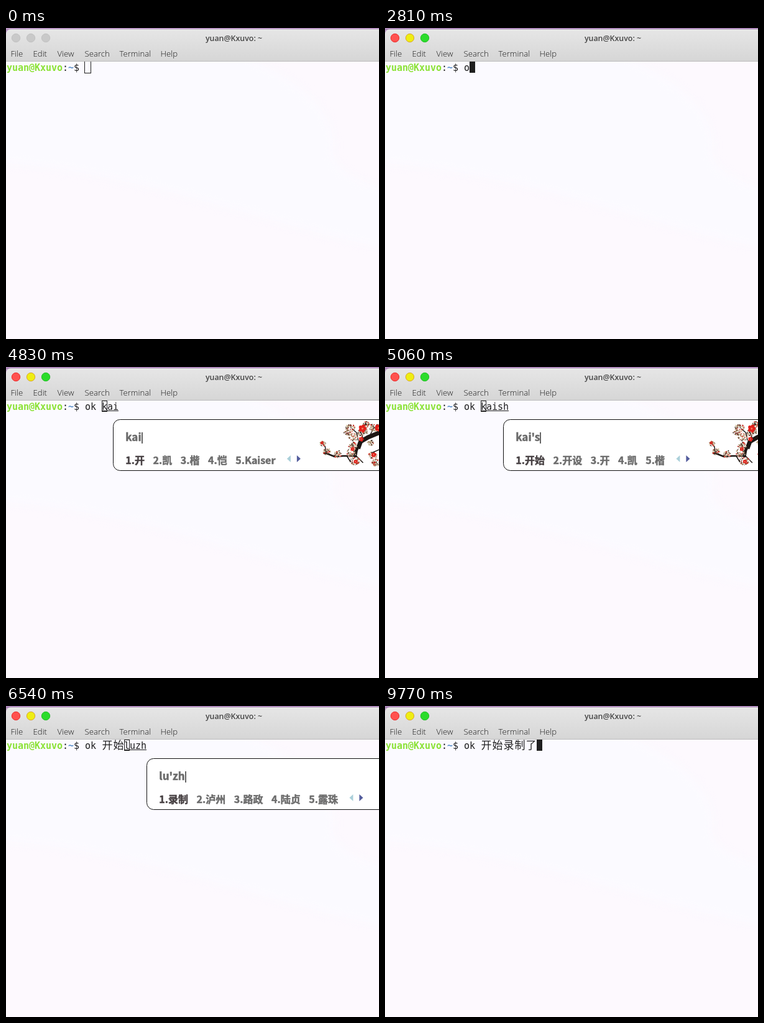
Write an HTML page with a canvas that moves like this. It is 600 by 500 pixels and loops after 9790 ms.

```html
<!DOCTYPE html>
<html lang="en">
<head>
<meta charset="utf-8">
<title>Terminal</title>
<style>
  html, body { margin: 0; width: 100%; height: 100%; overflow: hidden; background: #fdf9fe; }
  canvas { display: block; width: 600px; height: 500px; }
</style>
</head>
<body>
<canvas id="stage" width="600" height="500"></canvas>
<script>
const ctx = document.getElementById('stage').getContext('2d');
const LOOP = 9790, CELL = 9, HOME = 127, BASE = 69;
const SANS = '"Open Sans", "Noto Sans", sans-serif';
const MONO = '"DejaVu Sans Mono", "Noto Sans Mono", monospace';
const CJK = '"Noto Sans CJK SC", "Noto Sans CJK JP", "Noto Sans CJK", sans-serif';
const INK = '#1f1f1f';
const USER = 'yuan', HOST = 'Kxuvo';

// Candidates offered for each spelling
const WORDS = {
  "k": '看 可 开 快 卡',
  "ka": '卡 咖 喀 咔 咯',
  "kai": '开 凯 楷 恺 Kaiser',
  "kai's": '开始 开设 开 凯 楷',
  "kai'sh": '开始 开设 开 凯 楷',
  "kai'shi": '开始 开 凯 楷 恺',
  "l": '了 来 啦 ~\\(≧▽≦)/~啦啦啦 里',
  "lu": '路 录 陆 露 鹿',
  "lu'z": '录制 泸州 路政 陆贞 露珠',
  "lu'zh": '录制 泸州 路政 陆贞 露珠',
  "lu'zhi": '录制 录 路 陆 鹿',
  "le": '了 乐 勒 呢 肋'
};

// [time, committed text, cursor, spelling in the line, popup key, popup column]
const STEPS = [
  [0, '', 'idle'],
  [1290, '', 'on'],
  [1900, '', 'off'],
  [2500, '', 'on'],
  [2770, 'o', 'off'],
  [2810, 'o', 'on'],
  [3210, 'ok', 'on'],
  [3490, 'ok ', 'on'],
  [4060, 'ok ', 'off'],
  [4130, 'ok ', 'on'],
  [4580, 'ok ', 'box', 'k'],
  [4620, 'ok ', 'box', 'k', "k", 1],
  [4700, 'ok ', 'box', 'ka', "k", 1],
  [4750, 'ok ', 'box', 'ka', "ka", 2],
  [4800, 'ok ', 'box', 'kai', "ka", 2],
  [4830, 'ok ', 'box', 'kai', "kai", 2],
  [4880, 'ok ', 'box', 'kai', "kai", 3],
  [4950, 'ok ', 'box', 'kais', "kai", 3],
  [5000, 'ok ', 'box', 'kais', "kai's", 4],
  [5060, 'ok ', 'box', 'kaish', "kai's", 4],
  [5110, 'ok ', 'box', 'kaish', "kai'sh", 5],
  [5180, 'ok ', 'box', 'kaishi', "kai'shi", 6],
  [5500, 'ok 开始', 'on', '', "kai'shi", 2],
  [5540, 'ok 开始', 'on'],
  [5860, 'ok 开始', 'off'],
  [5960, 'ok 开始', 'box', 'l', "l", 1],
  [6130, 'ok 开始', 'box', 'lu', "l", 1],
  [6180, 'ok 开始', 'box', 'lu', "lu", 2],
  [6500, 'ok 开始', 'box', 'luz', "lu'z", 3],
  [6540, 'ok 开始', 'box', 'luzh', "lu'zh", 4],
  [6600, 'ok 开始', 'box', 'luzhi', "lu'zh", 4],
  [6650, 'ok 开始', 'box', 'luzhi', "lu'zhi", 5],
  [7080, 'ok 开始录制', 'on', '', "lu'zhi", 1],
  [7130, 'ok 开始录制', 'on'],
  [7370, 'ok 开始录制', 'box', 'l'],
  [7410, 'ok 开始录制', 'box', 'l', "l", 1],
  [7460, 'ok 开始录制', 'box', 'le', "l", 1],
  [7510, 'ok 开始录制', 'box', 'le', "le", 2],
  [7580, 'ok 开始录制了', 'on', '', "le", 0],
  [7630, 'ok 开始录制了', 'on'],
  [8480, 'ok 开始录制了 ', 'on'],
  [9040, 'ok 开始录制了 ', 'off'],
  [9640, 'ok 开始录制了 ', 'on'],
  [9770, 'ok 开始录制了', 'on']
];

const isWide = c => c > '\u2e80';

function text(str, x, y, font, color) {
  ctx.font = font;
  ctx.fillStyle = color;
  ctx.fillText(str, x, y);
}

// Bold text with a slightly thickened outline
function heavy(str, x, y, size, color) {
  text(str, x, y, `bold ${size}px ${CJK}`, color);
  ctx.strokeStyle = color;
  ctx.lineWidth = 0.5;
  ctx.strokeText(str, x, y);
  return x + ctx.measureText(str).width;
}

function rect(x, y, w, h, color) {
  ctx.fillStyle = color;
  ctx.fillRect(x, y, w, h);
}

// Text on the character grid; returns the x after it
function cells(str, x, color, weight = 'normal') {
  for (const c of str) {
    if (isWide(c)) text(c, x + 0.5, BASE, '17px ' + CJK, color);
    else text(c, x, BASE, `${weight} 15px ${MONO}`, color);
    x += isWide(c) ? 2 * CELL : CELL;
  }
  return x;
}

function mix(a, b, k) {
  return `rgb(${a.map((v, i) => Math.round(v + (b[i] - v) * k))})`;
}

function drawBackdrop() {
  rect(0, 0, 600, 500, '#fdf9fe');
  ctx.save();
  ctx.filter = 'blur(8px)';
  ctx.fillStyle = '#fbfaff';
  ctx.beginPath();
  ctx.moveTo(-20, 40);
  ctx.lineTo(370, 40);
  ctx.quadraticCurveTo(540, 110, 525, 200);
  ctx.quadraticCurveTo(530, 240, 620, 260);
  ctx.lineTo(620, 355);
  ctx.bezierCurveTo(420, 320, 240, 235, -20, 215);
  ctx.fill();
  ctx.restore();
}

function drawBar(focus) {
  rect(0, 0, 600, 1, '#cda9d8');
  rect(0, 1, 600, 1, mix([168, 134, 178], [141, 104, 156], focus));
  const g = ctx.createLinearGradient(0, 2, 0, 53);
  g.addColorStop(0, '#e6e6e6');
  g.addColorStop(1, '#d6d6d6');
  rect(0, 2, 12, 10, '#b795c2');
  ctx.fillStyle = g;
  ctx.beginPath();
  ctx.roundRect(0, 2, 620, 51, [8, 0, 0, 0]);
  ctx.fill();
  rect(7, 2, 593, 1, '#eae9ea');
  rect(0, 53, 600, 1, '#bcbcbc');

  const lamps = [
    [[255, 82, 79], [236, 44, 44]],
    [[238, 238, 18], [218, 164, 44]],
    [[43, 220, 43], [34, 190, 38]]
  ];
  lamps.forEach(([fill, edge], i) => {
    ctx.beginPath();
    ctx.arc(16 + 24 * i, 16, 6.7, 0, 7);
    ctx.fillStyle = mix([201, 201, 201], fill, focus);
    ctx.strokeStyle = mix([193, 193, 193], edge, focus);
    ctx.lineWidth = 1;
    ctx.fill();
    ctx.stroke();
  });

  ctx.textAlign = 'center';
  text(`${USER}@${HOST}: ~`, 366.5, 21, '600 12.4px ' + SANS, '#454545');
  ctx.textAlign = 'left';
  const menu = { File: 8, Edit: 44, View: 83, Search: 127, Terminal: 183, Help: 249 };
  for (const name in menu) text(name, menu[name] - 0.5, 46, '300 13.2px ' + SANS, '#1c1c1c');
}

function drawLine(typed, cursor, spelling) {
  let x = cells(`${USER}@${HOST}`, 1, '#8ae234', 'bold');
  x = cells(':', x, INK);
  x = cells('~', x, '#5f93cc', 'bold');
  cells('$', x, INK);
  const end = cells(typed, HOME, INK);
  ctx.strokeStyle = INK;
  ctx.lineWidth = 1;
  if (cursor === 'on') rect(end, 54, CELL, 18, INK);
  if (cursor === 'idle') {
    ctx.strokeRect(end - 0.5, 53.5, 10, 19);
    rect(end - 1, 53, 11, 1, '#bcbcbc');
  }
  if (spelling) {
    cells(spelling, end, INK);
    rect(end, 70, spelling.length * CELL, 1, INK);
    ctx.strokeRect(end + 0.5, 54.5, 8, 17);
  }
  return end;
}

function triangle(x, dir, color) {
  ctx.fillStyle = color;
  ctx.beginPath();
  ctx.moveTo(x, 142);
  ctx.lineTo(x + 6 * dir, 147.5);
  ctx.lineTo(x, 153);
  ctx.fill();
}

function drawBranch(x0) {
  let seed = 11;
  const rnd = () => (seed = seed * 16807 % 2147483647) / 2147483647;
  const limb = (w, d) => {
    ctx.lineWidth = w;
    ctx.stroke(new Path2D(d));
  };
  const dot = (x, y, r, color) => {
    ctx.fillStyle = color;
    ctx.beginPath();
    ctx.arc(x, y, r, 0, 7);
    ctx.fill();
  };
  ctx.save();
  ctx.translate(x0, 84);
  ctx.strokeStyle = '#1d1714';
  ctx.lineJoin = 'round';
  limb(1.5, 'M3 37 L9 44 L10 53 M62 34 L60 22 L52 15 M70 31 L66 20 M80 28 L88 12 M84 54 L98 48 M58 58 L70 70 M24 60 L32 50 M44 59 L50 69');
  limb(2.6, 'M6 54 L14 56 L24 60 L38 59 L58 59');
  limb(5, 'M57 61 L59 50 L63 42');
  limb(7, 'M62 47 L66 36 L78 29 L100 20');

  const tones = ['#c9b795', '#e2d6ba', '#6b4934', '#3a2a20', '#d4251d', '#a98f6b'];
  const clumps = [[5, 39, 5], [12, 52, 6], [29, 57, 6], [50, 14, 8], [44, 21, 5], [51, 54, 8], [57, 67, 8],
    [54, 28, 8], [53, 43, 7], [76, 9, 6], [88, 14, 8], [86, 58, 7], [91, 70, 7], [70, 21, 8], [82, 38, 5]];
  for (const [cx, cy, r] of clumps) {
    for (let i = 0; i < r * 7; i++) {
      const a = rnd() * 6.28, d = Math.sqrt(rnd()) * r;
      dot(cx + Math.cos(a) * d, cy + Math.sin(a) * d * 0.85, 0.5 + rnd() * 0.8, tones[Math.floor(rnd() * tones.length)]);
    }
  }
  const blooms = [[69, 15, 3.8], [95, 14, 3.6], [67, 32, 2.4], [53, 48, 2], [87, 57, 2.4], [4, 38, 1.6], [58, 68, 2]];
  for (const [cx, cy, r] of blooms) {
    for (let k = 0; k < 5; k++) dot(cx + Math.cos(k * 1.257) * r, cy + Math.sin(k * 1.257) * r, r * 0.7, '#e3211b');
    dot(cx, cy, r * 0.35, '#f5835f');
  }
  ctx.restore();
}

function drawPopup(key, x) {
  ctx.save();
  ctx.beginPath();
  ctx.roundRect(x + 0.5, 84.5, 660 - x, 82, 11);
  ctx.fillStyle = '#fff';
  ctx.fill();
  ctx.strokeStyle = '#111';
  ctx.lineWidth = 1;
  ctx.stroke();
  ctx.clip();

  const left = x + 20.3;
  const caret = heavy(key, left, 119, 17, '#6b6b6b');
  rect(Math.round(caret), 105, 2, 18, '#666');

  let at = left, end = left;
  WORDS[key].split(' ').forEach((word, i) => {
    end = heavy(`${i + 1}.${word}`, at, 155.5, 16, i ? '#6c6c6c' : '#474143');
    at = end + 13.6;
  });
  triangle(end + 24.5, -1, '#abd0da');
  triangle(end + 34.5, 1, '#535c9c');
  drawBranch(end + 71);
  ctx.restore();
}

function draw(now) {
  const t = now % LOOP;
  const [, typed, cursor, spelling, key, col] = STEPS.findLast(s => s[0] <= t);
  const stage = t < 1150 ? 0 : Math.min(6, 1 + Math.floor((t - 1150) / 68));
  drawBackdrop();
  drawBar(stage / 6);
  const end = drawLine(typed, cursor, spelling);
  if (key) drawPopup(key, end + col * CELL);
}

const start = performance.now();
function tick() {
  draw(performance.now() - start);
  requestAnimationFrame(tick);
}
tick();
</script>
</body>
</html>
```
